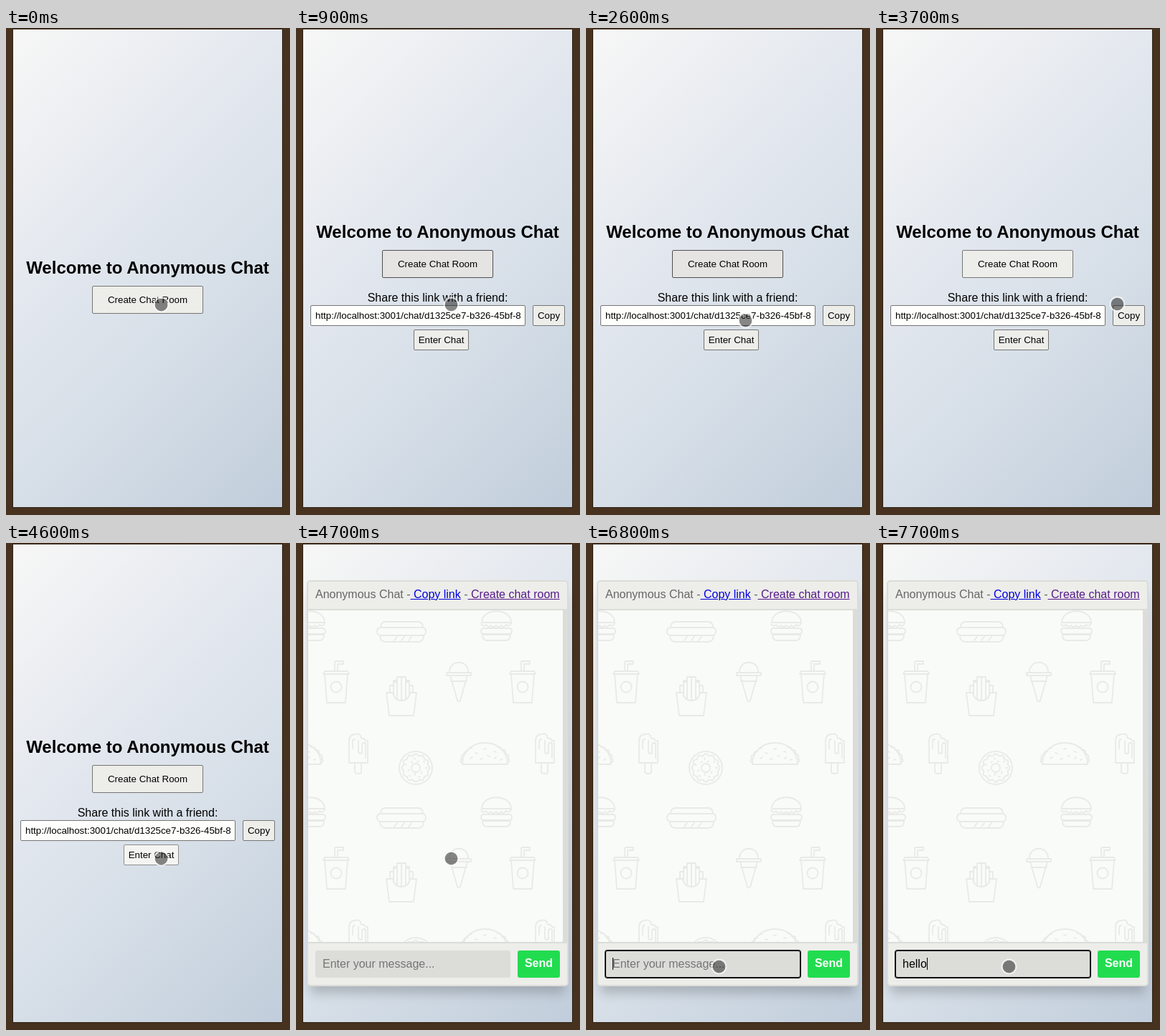
These frames come from a looping animation (396 by 680 pixels, 8 s). An HTML page with a canvas:

```html
<!DOCTYPE html>
<html lang="en">
<head>
<meta charset="utf-8">
<title>Anonymous Chat</title>
<style>
  html, body { margin: 0; width: 100%; height: 100%; overflow: hidden; background: #46321f; }
  body { position: relative; font: 16px/17px "Liberation Sans", Arial, sans-serif; color: #000; }
  div, canvas { position: absolute; box-sizing: border-box; white-space: pre; }
  #page {
    left: 10px; top: 2px; width: 375px; height: 667px;
    background: linear-gradient(135deg, #f7f7f6 0%, #e1e6ee 42%, #d5dee7 66%, #c1cddb 100%);
    box-shadow: 0 0 0 1px #302214;
  }
  #home, #chat { left: 0; top: 0; width: 396px; height: 680px; }
  h1 { position: absolute; margin: 0; left: 10px; width: 375px; top: 321px; text-align: center; font-size: 24px; line-height: 27px; white-space: pre; }
  .box {
    display: flex; align-items: center; justify-content: center;
    font-size: 13.333px; line-height: 15px;
    border: 1px solid #767674; border-radius: 2px; background: #ededea;
  }
  .hover { background: #e5e4e2; border-color: #4f4f4f; }
  .active { background: #f4f5f2; border-color: #8f8f8f; }
  #create { left: 120px; top: 360px; width: 155px; height: 39px; }
  #share { left: 0; top: 0; }
  #label { left: 10px; top: 368px; width: 375px; text-align: center; }
  #url { left: 20px; top: 387px; width: 300px; height: 29px; background: #fefefd; padding: 0 6px; justify-content: flex-start; }
  #url span { overflow: hidden; }
  #copy { left: 330px; top: 387px; width: 45px; height: 29px; }
  #enter { left: 164px; top: 421px; width: 77px; height: 29px; }
  #panel {
    left: 15px; top: 52px; width: 365px; height: 567px;
    border: 2px solid #dcdcd8; border-radius: 5px; background: #ededea;
    box-shadow: 0 15px 15px -5px rgba(0, 0, 0, .2);
  }
  #body { left: 15px; top: 92px; width: 365px; height: 467px; border: 2px solid #dcdcd8; border-right-width: 8px; background: #f9fbf8; }
  #food { left: 0; top: 0; }
  #head { left: 27px; top: 63px; color: #666; }
  #head u { color: #0000e0; }
  #head u + u { color: #551a8b; }
  #field { left: 27px; top: 569px; width: 272px; height: 38px; border-radius: 3px; background: #dcddd8; }
  #field.focus { box-shadow: 0 0 0 1px #101010, inset 0 0 0 1px #101010; }
  #text { left: 10px; top: 10px; }
  #text.hint { color: #757575; }
  #caret { top: 10px; width: 1px; height: 17px; background: #000; }
  #send { left: 309px; top: 569px; width: 59px; height: 38px; padding-top: 9px; border-radius: 3px; background: #22dc50; color: #fff; font-weight: bold; text-align: center; }
  #dot {
    left: -11px; top: -11px; width: 22px; height: 22px; border-radius: 50%;
    border: 2px solid rgba(250, 250, 250, .65); background: rgba(38, 38, 38, .55) padding-box;
  }
  #dot.down { background-color: rgba(30, 30, 30, .62); }
</style>
</head>
<body>
<div id="page"></div>

<div id="home">
  <h1 id="title">Welcome to Anonymous Chat</h1>
  <div id="create">Create Chat Room</div>
  <div id="share">
    <div id="label">Share this link with a friend:</div>
    <div id="url" class="box"><span>http://localhost:3001/chat/d1325ce7-b326-45bf-8</span></div>
    <div id="copy">Copy</div>
    <div id="enter">Enter Chat</div>
  </div>
</div>

<div id="chat">
  <div id="panel"></div>
  <div id="body"></div>
  <canvas id="food" width="396" height="680"></canvas>
  <div id="head">Anonymous Chat -<u> Copy link</u> -<u> Create chat room</u></div>
  <div id="field"><div id="text"></div><div id="caret"></div></div>
  <div id="send">Send</div>
</div>

<div id="dot"></div>

<script>
const LOOP = 8000, STEP = 100, TILE = 260;
const $ = id => document.getElementById(id);

// pointer stops: time, x, y
const path = [
  [0, 216, 386], [1700, 216, 386], [1800, 215, 390], [2000, 212, 412], [2200, 219, 435],
  [2300, 226, 436], [2400, 229, 428], [2600, 222, 408], [2700, 371, 393], [2800, 371, 393],
  [2900, 380, 396], [3000, 359, 398], [3100, 359, 398], [3200, 346, 402], [3600, 346, 402],
  [3700, 336, 385], [3800, 302, 370], [3900, 252, 376], [4000, 212, 405], [4100, 198, 436],
  [4200, 206, 449], [4300, 216, 440], [5200, 216, 440], [5300, 215, 444], [5500, 208, 490],
  [5700, 196, 565], [5800, 189, 588], [5900, 183, 591], [6000, 185, 591]
];

// state changes: the last entry not later than t holds
const createState = [[0, ""], [900, "hover"], [3200, ""]];
const copyState = [[0, ""], [3200, "hover"], [3400, "active"], [3500, "hover"], [3700, ""]];
const enterState = [[0, ""], [4500, "hover"], [4600, "active"]];
const typed = [[0, ""], [7100, "h"], [7400, "hel"], [7700, "hello"]];

const at = (list, t) => list.reduce((v, [start, value]) => t >= start ? value : v, "");

function pointer(t) {
  const i = path.findIndex(p => p[0] > t);
  if (i < 0) return path[path.length - 1].slice(1);
  const [t0, x0, y0] = path[i - 1], [t1, x1, y1] = path[i];
  const k = (t - t0) / (t1 - t0);
  return [x0 + (x1 - x0) * k, y0 + (y1 - y0) * k];
}

const icons = [
  // burger
  "M259 111C259 90 300 90 300 111ZM258 113q3.5 5 7 1q3.5 5 7 1q3.5 5 7 0q3.5 5 7 0q3.5 4 7-1q4 4 7-2" +
  "M262 119H297Q301 119 301 123T297 127H262Q258 127 258 123T262 119M260 128H299Q299 136 293 136H266Q260 136 260 128",
  // hot dog
  "M118 118Q118 110 125 110H170Q177 110 177 118M119 118H176Q181 118 181 123.500T176 129H119Q113 129 113 123.500T119 118" +
  "M117 129Q117 138 125 138H170Q178 138 178 129M137 136l4-5M147 136l4-5M157 136l4-5",
  // cup
  "M40 179H72L74 183H38ZM40 183L43 223H69L72 183M63.500 201a7.500 7.500 0 1 0-15 0a7.500 7.500 0 1 0 15 0" +
  "M54 178V167Q54 165 56 165H66V169H58V178",
  // fries
  "M126 209H135Q137 220 147 220T159 209H168L164 241H130ZM131 208V199H136V192H141V187H153V192H158V199H163V208" +
  "M136 199V211M141 192V217M147 187V219M153 192V217M158 199V211M137 194H141M153 194H157",
  // ice cream
  "M214 181C213 162 241 162 240 181M210 181H244V185H210ZM215 185L225 220Q227 223 229 220L239 185M216 193H238M219 181h3M231 181h3",
  // ice lolly
  "M74 307V277Q74 267 83 267Q87 265 90 269Q90 274 95 273Q96 277 100 276V307ZM82 308V319Q82 322 87 322T91 319V308" +
  "M79 287V278Q79 274 82 274M87 276V291Q87 294 90 294T92 291V283Q92 279 95 279T97 283V300",
  // taco
  "M232 309C232 269 295 269 295 309ZM232 307Q227 305 231 301Q229 296 234 296Q234 290 239 291Q240 286 245 286" +
  "M294 307Q300 305 296 301Q298 296 292 294Q293 288 287 289Q286 284 281 285" +
  "M243 301l3-2M250 293l3 1M257 302l3-1M262 288l3-1M267 297l3 1M277 301l2-2M276 291l3 1M285 303l2-1"
];

function ring(g, cx, cy, r, wave) {
  g.beginPath();
  for (let i = 0; i <= 120; i++) {
    const a = i / 120 * Math.PI * 2, q = r + wave * Math.cos(a * 12);
    g.lineTo(cx + q * Math.cos(a), cy + q * Math.sin(a));
  }
  g.stroke();
}

function donut(g) {
  ring(g, 167, 314, 23, 0);
  ring(g, 167, 314, 18.5, 1.2);
  ring(g, 167, 314, 6, 0);
  g.beginPath();
  for (let i = 0; i < 11; i++) {
    const a = i * Math.PI * 2 / 11, r = i % 2 ? 10 : 14;
    const x = 167 + r * Math.cos(a), y = 314 + r * Math.sin(a);
    g.moveTo(x, y);
    g.lineTo(x + 2 * Math.cos(a * 3), y + 2 * Math.sin(a * 3));
  }
  g.stroke();
}

function drawFood() {
  const g = $("food").getContext("2d");
  const shapes = icons.map(d => new Path2D(d));
  g.beginPath();
  g.rect(17, 94, 355, 463);
  g.clip();
  g.strokeStyle = "#e9eae7";
  g.lineWidth = 1.8;
  g.lineJoin = g.lineCap = "round";
  for (const dx of [-TILE, 0, TILE]) {
    for (const dy of [0, TILE]) {
      g.save();
      g.translate(dx, dy);
      shapes.forEach(s => g.stroke(s));
      donut(g);
      g.restore();
    }
  }
}

function render(t) {
  const shared = t >= 900, chatting = t >= 4700;
  $("home").hidden = chatting;
  $("chat").hidden = !chatting;
  $("share").hidden = !shared;
  $("title").style.top = (shared ? 271 : 321) + "px";
  $("create").style.top = (shared ? 310 : 360) + "px";
  $("create").className = "box " + at(createState, t);
  $("copy").className = "box " + at(copyState, t);
  $("enter").className = "box " + at(enterState, t);

  const word = at(typed, t), text = $("text");
  text.textContent = word || "Enter your message...";
  text.className = word ? "" : "hint";
  $("field").className = t >= 6400 ? "focus" : "";
  $("caret").hidden = t < 6400;
  $("caret").style.left = 10 + (word ? Math.round(text.getBoundingClientRect().width) : 0) + "px";

  const [x, y] = pointer(t);
  $("dot").style.transform = `translate(${x + 0.5}px, ${y + 0.5}px)`;
  $("dot").className = t >= 6400 && t < 6800 ? "down" : "";
}

const start = performance.now();
function tick() {
  const t = (performance.now() - start) % LOOP;
  render(Math.floor(t / STEP) * STEP);
  requestAnimationFrame(tick);
}

drawFood();
tick();
</script>
</body>
</html>
```
